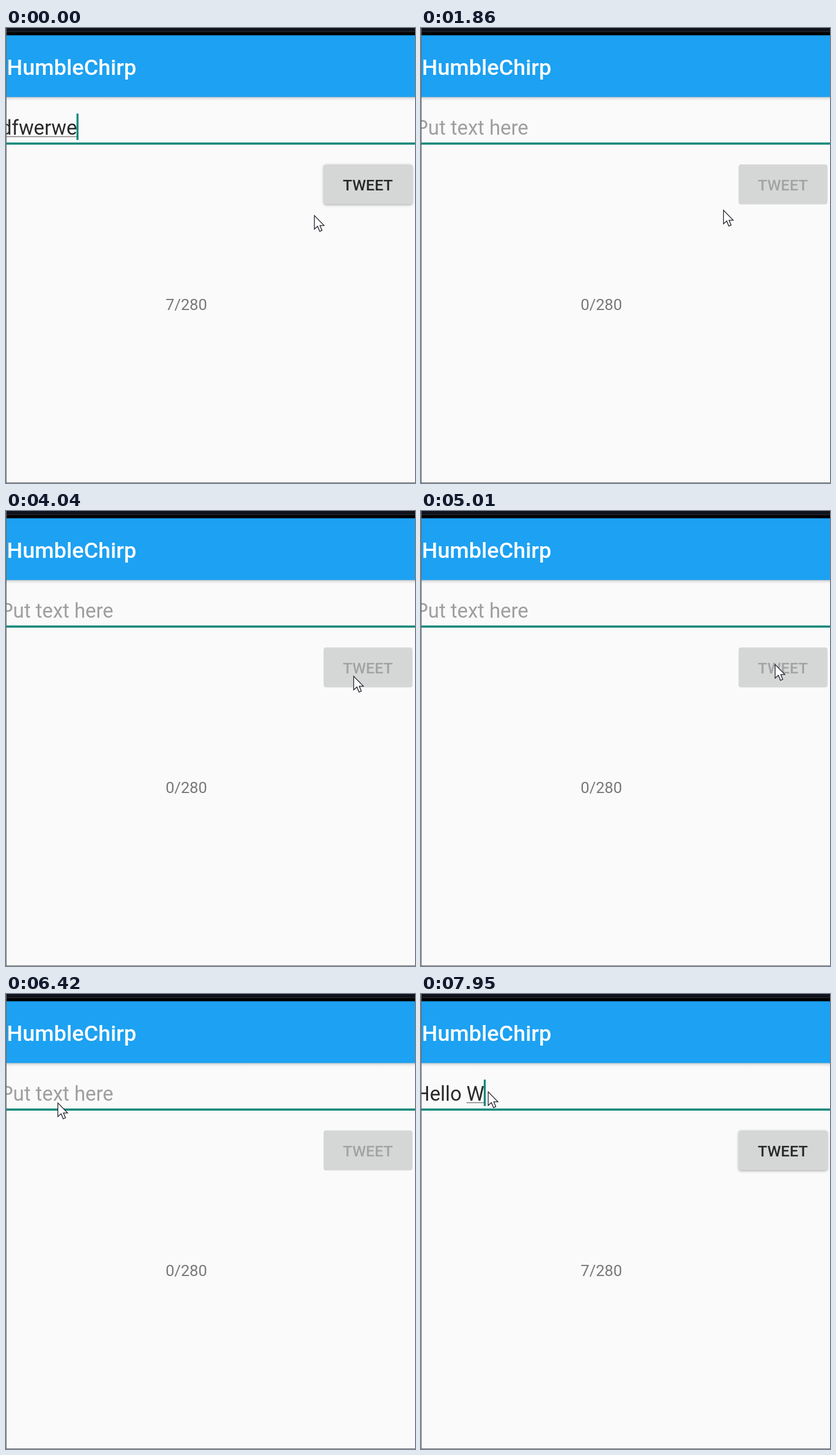
Write an HTML page with a canvas that moves like this. It is 697x776 px and loops after 8000 ms.

```html
<!DOCTYPE html>
<html lang="en">
<head>
<meta charset="utf-8">
<title>Message composer</title>
<style>
  html, body { margin: 0; width: 100%; height: 100%; overflow: hidden; background: #fafafa; }
  canvas { display: block; }
</style>
</head>
<body>
<canvas id="stage" width="697" height="776"></canvas>
<script>
const ctx = document.getElementById('stage').getContext('2d');
const LOOP = 8000;
const TEXT_X = -9.5;
const INPUT_FONT = '34.2px Roboto, sans-serif';
const TEAL = '#10877b', EDGE = '#6e6e6e';

// Each gesture runs along its key points in a fixed number of visible steps.
const gestures = [
  { start: 0, end: 260, steps: 3, path: [[525, 319], [521, 311]] },
  { start: 1860, end: 2660, steps: 6, path: [[515, 310], [207, 248], [521, 311], [512, 162], [362, 244]] },
  { start: 2910, end: 3900, steps: 8, path: [[390, 240], [590, 304], [595, 286]] },
  { start: 4040, end: 5010, steps: 8, path: [[592, 281], [572, 254], [614, 256], [603, 261]] },
  { start: 5150, end: 6160, steps: 8, path: [[472, 338], [270, 481], [322, 408]] },
  { start: 6280, end: 6830, steps: 5, path: [[52, 203], [88, 185], [114, 166]], ease: u => 1 - (1 - u) ** 2.4 }
];

function pointerAt(t) {
  const { start, end, steps, path, ease = u => u } = gestures.findLast(g => g.start <= t);
  const last = steps - 1;
  const step = Math.min(last, Math.floor((t - start) / (end - start) * last + 1e-6));
  const along = ease(step / last) * (path.length - 1);
  const i = Math.min(Math.floor(along), path.length - 2);
  return path[i].map((from, axis) => from + (path[i + 1][axis] - from) * (along - i));
}

// A held backspace: one letter, a pause, then quick repeats; later new text is typed.
function textAt(t) {
  if (t >= 7240) return 'Hello W'.slice(0, 2 + Math.floor((t - 7240) / 142));
  const left = t < 520 ? 7 : t < 920 ? 6 : t < 1040 ? 3 : 0;
  return 'dfwerwe'.slice(0, left);
}

function rect(x, y, w, h, color) {
  ctx.fillStyle = color;
  ctx.fillRect(x, y, w, h);
}

function text(str, x, y, font, color) {
  ctx.font = font;
  ctx.fillStyle = color;
  ctx.fillText(str, x, y);
}

function drawHeader() {
  rect(0, 0, 697, 13, '#000');
  rect(0, 0, 697, 6, '#10131c');
  rect(0, 6, 697, 1, '#2b2e36');
  const shadow = ctx.createLinearGradient(0, 117, 0, 124);
  shadow.addColorStop(0, '#b9b9b9');
  shadow.addColorStop(0.4, '#e2e2e2');
  shadow.addColorStop(1, '#fafafa');
  rect(0, 117, 697, 7, shadow);
  rect(0, 12.4, 697, 105.3, '#1da1f2');
  text('HumbleChirp', 1.5, 80, '500 37.6px Roboto, sans-serif', '#fff');
}

function drawInput(value) {
  rect(0, 195.3, 697, 3.6, TEAL);
  if (!value) {
    text('Put text here', TEXT_X, 182, INPUT_FONT, '#9f9f9f');
    return;
  }
  text(value, TEXT_X, 182, INPUT_FONT, '#2a2a2a');
  const end = TEXT_X + ctx.measureText(value).width;
  const wordStart = TEXT_X + ctx.measureText(value.slice(0, value.lastIndexOf(' ') + 1)).width;
  rect(wordStart, 184.5, end - wordStart, 1.7, '#8c8c8c');
  rect(end - 1, 146, 3.4, 45, TEAL);
}

function drawButton(enabled) {
  ctx.save();
  ctx.shadowColor = `rgba(0,0,0,${enabled ? 0.32 : 0.15})`;
  ctx.shadowBlur = enabled ? 4 : 1;
  ctx.shadowOffsetY = enabled ? 1.5 : 0.5;
  ctx.fillStyle = '#d5d6d6';
  ctx.beginPath();
  ctx.roundRect(541.5, 232.8, 151, 67.5, 4);
  ctx.fill();
  ctx.restore();
  text('TWEET', 574, 276.5, '500 26.3px Roboto, sans-serif', enabled ? '#292929' : '#a2a3a3');
}

const arrow = new Path2D('M.5 .8V24L6 19.2L9.6 27.8L13.5 26.2L10 17.8H17Z');

function drawPointer(x, y) {
  ctx.save();
  ctx.translate(x, y);
  ctx.fillStyle = '#fff';
  ctx.strokeStyle = '#22222c';
  ctx.lineWidth = 1.3;
  ctx.fill(arrow);
  ctx.stroke(arrow);
  ctx.restore();
}

function draw(t) {
  const value = textAt(t);
  rect(0, 0, 697, 776, '#fafafa');
  drawHeader();
  drawInput(value);
  drawButton(value !== '');
  text(value.length + '/280', 272, 481, '26.6px Roboto, sans-serif', '#787878');
  rect(0, 0, 1, 776, EDGE);
  rect(0, 775, 697, 1, EDGE);
  drawPointer(...pointerAt(t));
}

const start = performance.now();
function tick() {
  draw((performance.now() - start) % LOOP);
  requestAnimationFrame(tick);
}
tick();
</script>
</body>
</html>
```
